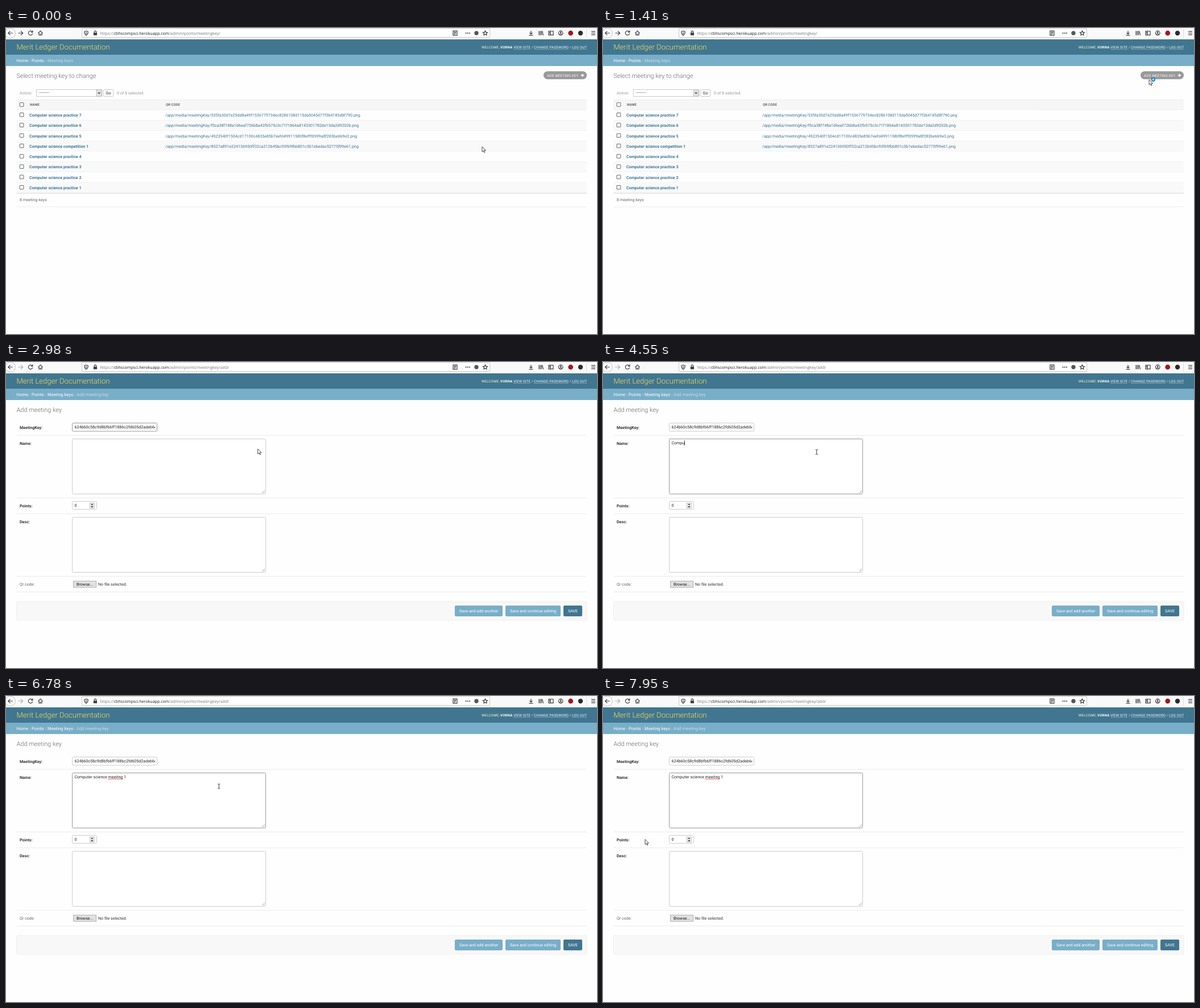
Animation, 1039 px wide and 539 px high, one loop 7990 ms. Source, as an HTML page:

```html
<!DOCTYPE html>
<html lang="en">
<head>
<meta charset="utf-8">
<title>Meeting keys</title>
<style>
html, body { margin: 0; width: 100%; height: 100%; overflow: hidden; background: #fefefe; }
svg { display: block; width: 1039px; height: 539px; }
text { font-family: Roboto, "Noto Sans", sans-serif; text-rendering: geometricPrecision; white-space: pre; }
.url { font-family: "Open Sans", "Noto Sans", sans-serif; }
.caps { letter-spacing: .27px; }
.icon { fill: none; stroke: #3c3c40; stroke-width: 1.2; }
</style>
</head>
<body>
<svg id="stage" viewBox="0 0 1039 539"></svg>
<script>
const LOOP = 7990, OPEN = 1740, LOADED = 2580, CLICK = 3370;
const BODY = 7.11, SMALL = 6.02;
const LINK = '#3a7497', DARK = '#417690', LIGHT = '#79aec8';

const text = (x, y, s, fill = '#333', size = BODY, weight = 400, attrs = '') =>
  `<text x="${x}" y="${y}" fill="${fill}" font-size="${size}" font-weight="${weight}" ${attrs}>${s}</text>`;
const caps = (x, y, s, fill, weight = 400) => text(x, y, s, fill, SMALL, weight, 'class="caps"');
const rect = (x, y, w, h, fill, stroke = 'none', rx = 0, attrs = '') =>
  `<rect x="${x}" y="${y}" width="${w}" height="${h}" fill="${fill}" stroke="${stroke}" rx="${rx}" ${attrs}/>`;
const path = (d, attrs = 'class="icon"') => `<path d="${d}" ${attrs}/>`;
const dot = (x, y, r, fill) => `<circle cx="${x}" cy="${y}" r="${r}" fill="${fill}"/>`;
const group = (id, s) => `<g id="${id}">${s}</g>`;
const rule = (y, fill = '#ececec') => rect(18.5, y, 1002.5, 1, fill);

function browserBar() {
  const url = (id, page) => `<text id="${id}" class="url" x="165.5" y="12" font-size="7.1" fill="#77777b">https://<tspan
    fill="#18181b">cbhscompsci.herokuapp.com</tspan>/admin/points/meetingkey/${page}</text>`;
  return rect(0, 0, 1039, 20, '#f9f9fa') +
    rect(133.5, .5, 717, 16, '#fff', '#c8c8cc', 1.5) +
    '<circle cx="7.5" cy="9" r="8.8" fill="#fff" stroke="#bcbcc0"/>' +
    path('M12 9H4M7.5 5.3L3.8 9L7.5 12.7') +
    path('M21.5 9H29.5M26 5.3L29.7 9L26 12.7', 'class="icon" id="forward"') +
    path('M46 6.6A3.7 3.7 0 1 0 46.7 9.6M46.9 4.6V7.3H44', 'class="icon" id="reload"') +
    path('M39.5 5.5L46.5 12.5M46.5 5.5L39.5 12.5', 'class="icon" id="stop" style="stroke:#99999d"') +
    path('M56.5 9.2L60.5 5.2L64.5 9.2M58 8.5V12.5H63V8.5M60.5 12.5V10') +
    path('M141 5.3L144.2 6.3Q144.3 11 141 13Q137.7 11 137.8 6.3ZM141 7V11') +
    rect(153.8, 8.2, 6.2, 4.6, '#3c3c40', 'none', .6) + path('M155.2 8.5V6.8a1.7 1.7 0 0 1 3.4 0V8.5') +
    url('listUrl', '') + url('addUrl', 'add/') +
    group('reader', path('M786 5.2H793V12.8H786ZM787.6 7.3H791.4M787.6 9H791.4M787.6 10.7H790')) +
    [808.6, 811.8, 815].map(x => dot(x, 9, 1.1, '#3c3c40')).join('') +
    dot(827, 9, 3.7, '#55555a') +
    path('M842.5 5L843.7 7.6L846.5 7.9L844.4 9.8L845 12.6L842.5 11.2L840 12.6L840.6 9.8L838.5 7.9L841.3 7.6Z') +
    path('M923 5V10.5M920.5 8.3L923 10.8L925.5 8.3M919.5 12.8H926.5') +
    path('M937 5.2V12.8M939.2 5.2V12.8M941.4 5.2V12.8M942.6 5.5L944.6 12.8') +
    path('M954 5.5H962V12.3H954ZM957.2 5.5V12.3M955 7.5H956.5M955 9.2H956.5') +
    '<circle class="icon" cx="975.2" cy="9" r="3.8"/>' + dot(975.2, 7.9, 1.4, '#3c3c40') +
    path('M972.9 11.4a2.6 2 0 0 1 4.6 0') +
    dot(992.7, 9, 4.4, '#a3161d') + dot(1010, 9, 4.2, '#2b2b2e') +
    rect(1020, 2, .8, 15, '#d8d8dc') +
    path('M1029 6.2H1036M1029 9H1036M1029 11.8H1036');
}

function header() {
  const tool = (x, w, s) => caps(x, 35.6, s, '#fff') + rect(x, 37, w, .7, '#fff', 'none', 0, 'opacity=".45"');
  return rect(0, 20, 1039, 27, DARK) + rect(0, 47, 1039, 20, LIGHT) +
    text(18.5, 38, 'Merit Ledger Documentation', '#f5dd5d', 13.12, 300) +
    caps(836, 35.6, 'WELCOME,', '#ffc') + caps(869, 35.6, 'VORNA', '#fff', 700) + caps(888.3, 35.6, '.', '#ffc') +
    tool(892, 30, 'VIEW SITE') + caps(924, 35.6, '/', '#ffc') +
    tool(928, 61, 'CHANGE PASSWORD') + caps(990.8, 35.6, '/', '#ffc') + tool(995, 26, 'LOG OUT') +
    text(18.5, 59.5, 'Home', '#fff', 7.65) + text(41, 59.5, '›', '#c4dce8', 7.65) +
    text(45, 59.5, 'Points', '#fff', 7.65) + text(69, 59.5, '›', '#c4dce8', 7.65);
}

const title = s => text(18.5, 88.2, s, '#666', 10.94, 300);

function listPage() {
  const files = [
    '535fa30d7e25dd8a49f1536779734ec8286108d115da5045d77f3b4185d8f790',
    'f5ca38f748a1d6eaf726b8a42fb575c3c71f1864a8143301782de13da2d9202b',
    '4523540f1504cd17100c4835e85b7eefd49911580f8efff0599a8f283be6b9e3',
    '8527a891e224136950ff32ca212b45bc93f69fbb801c3b1ebedac52775f99e61'];
  const names = ['practice 7', 'practice 6', 'practice 5', 'competition 1',
    'practice 4', 'practice 3', 'practice 2', 'practice 1'];
  const box = y => rect(24.3, y - 3.4, 6.6, 6.6, '#fff', '#555', .5, 'stroke-width=".9"');
  const rows = names.map((name, i) => {
    const y = 144.5 + 18.27 * i, base = y + 11.5;
    return rect(18.5, y, 1002.5, 18.27, i % 2 ? '#f9f9f9' : '#fefefe') + rule(y + 17.5, '#f0f0f0') +
      box(y + 8.4) + text(41, base, 'Computer science ' + name, LINK, BODY, 700) +
      (files[i] ? text(280, base, `/app/media/meetingKey/${files[i]}.png`, LINK) : '');
  }).join('');
  return text(73, 59.5, 'Meeting keys', '#c4dce8', 7.65) + title('Select meeting key to change') +
    rect(945, 76.3, 76, 14, '#999', 'none', 7, 'id="addButton"') + caps(951, 85.6, 'ADD MEETING KEY', '#fff') +
    path('M1010.8 83.4H1016.2M1013.5 80.7V86.1', 'stroke="#fff" stroke-width="1.6"') +
    text(24, 116.8, 'Action:', '#999') +
    rect(53.5, 108.5, 115, 12, '#fff', '#ccc') + text(58, 116.4, '---------') +
    rect(159, 108.8, 9, 11.4, '#e4e4e4', '#b4b4b4', 0, 'stroke-width=".8"') +
    path('M161.7 113.5L163.6 115.5L165.5 113.5') +
    rect(171, 108.5, 18, 12, '#fafafa', '#ccc', 2) + text(175.6, 116.8, 'Go') +
    text(195, 116.8, '0 of 8 selected', '#999') +
    rect(18.5, 126, 1002.5, 18.5, '#f6f6f6') + rect(281, 127, 740, 17, '#eee', 'none', 0, 'id="headHover"') +
    rule(126) + rule(143.8) + box(135) +
    text(42, 137.4, 'NAME', '#666', SMALL, 700) + text(281, 137.4, 'QR CODE', '#666', SMALL, 700) +
    rows + rule(290.6, '#ddd') + text(24, 305.2, '8 meeting keys', '#666') + rule(314.5, '#eee');
}

function addPage() {
  const label = (y, s) => text(24, y, s, '#333', BODY, 700);
  const area = (id, y) => rect(116.5, y, 340, 97, '#fff', '#ccc', 2, `id="${id}"`) +
    path(`M450 ${y + 95.5}L455 ${y + 90.5}M452.5 ${y + 95.5}L455 ${y + 93}`, 'stroke="#999" stroke-width=".8"');
  const button = (x, w, fill, tx, s) => rect(x, 429, w, 19, fill, 'none', 2) + text(tx, 441, s, '#fff');
  return text(73, 59.5, 'Meeting keys', '#fff', 7.65) + text(120, 59.5, '›', '#c4dce8', 7.65) +
    text(124, 59.5, 'Add meeting key', '#c4dce8', 7.65) + title('Add meeting key') +
    [128.7, 239, 266.7, 377, 404.5].map(y => rule(y)).join('') +
    label(118.3, 'MeetingKey:') + label(146.1, 'Name:') + label(256.2, 'Points:') + label(284.1, 'Desc:') +
    text(24, 394.1, 'Qr code:', '#666') +
    rect(116.5, 107.5, 149, 14.5, '#fff', '#ccc', 2, 'id="keyField"') +
    '<clipPath id="clip"><rect x="118" y="108" width="144.3" height="14"/></clipPath>' +
    text(120.4, 117.3, '624b60c58c9d8bfb6ff1886c2fd605d2adeb6e1', '#222', BODY, 400, 'clip-path="url(#clip)"') +
    area('nameField', 135.5) + area('descField', 273.5) +
    text(120.4, 145.2, '', '#222', BODY, 400, 'id="typed"') +
    path('M179.5 147' + 'l1 -1.2l1 1.2'.repeat(13), 'id="squiggle" fill="none" stroke="#e22" stroke-width=".7"') +
    rect(0, 0, .8, 9, '#111', 'none', 0, 'id="caret"') +
    rect(116.5, 245.5, 43, 14, '#fff', '#ccc', 2) + text(120.4, 255.3, '0', '#222') +
    rect(147.4, 248.2, 7.8, 9.4, '#eee', '#aaa', 0, 'stroke-width=".7"') +
    path('M149.2 251.8L151.3 249.4L153.4 251.8ZM149.2 254L151.3 256.4L153.4 254Z', 'fill="#222"') +
    rect(118.5, 386, 40, 11, '#e2e2e2', '#adadad') + text(124, 394.1, 'Browse...', '#111') +
    text(162, 394.1, 'No file selected.') +
    rect(18.5, 422, 1002.5, 33, '#f8f8f8', '#eee', 2) +
    button(789, 84, LIGHT, 797, 'Save and add another') +
    button(878, 97, LIGHT, 886, 'Save and continue editing') +
    button(980, 33, DARK, 988, 'SAVE');
}

const pointers = group('arrow', path('M0 0V9L2.1 7.1L3.6 10.4L5 9.8L3.6 6.6H6.4Z',
    'fill="#fff" stroke="#222" stroke-width=".8"')) +
  group('beam', path('M-2 -4H-.5L0 -3.5L.5 -4H2M0 -3.5V3.5M-2 4H-.5L0 3.5L.5 4H2',
    'fill="none" stroke="#222" stroke-width=".9"')) +
  group('hand', path('M-1 1Q0 -.8 1 1V4.5L5 5.5V8L4 11H0L-3 7L-2.2 6L-1 7Z',
    'fill="#fff" stroke="#222" stroke-width=".8"')) +
  group('busy', '<circle cx="7.3" cy="-.3" r="2.7" fill="#bfe3fa" stroke="#1f86d0" stroke-width="2"/>' +
    path('M7.3 -4A3.7 3.7 0 0 1 11 -.3', 'id="spin" fill="none" stroke="#6cc0f2" stroke-width="1"'));

const stage = document.getElementById('stage');
stage.innerHTML = browserBar() + header() + group('listPage', listPage()) + group('addPage', addPage()) +
  group('pointer', pointers);

const el = id => document.getElementById(id);
const show = (id, on) => el(id).setAttribute('visibility', on ? 'inherit' : 'hidden');
const set = (id, name, value) => el(id).setAttribute(name, value);

// Pointer stops: time, x, y
const stops = [[0, 837, 209], [80, 837, 209], [250, 850, 193], [600, 905, 136], [870, 929, 111],
  [1130, 962, 85], [1300, 962, 85], [1400, 960, 91], [1650, 961, 91], [1740, 963, 89.3], [2170, 963, 89.3],
  [2300, 890, 104], [2530, 721, 128], [2980, 443, 153], [3180, 380, 158], [3300, 375.7, 158.5],
  [6700, 375.7, 158.5], [6780, 374.5, 159], [6950, 352, 165], [7300, 230, 212], [7570, 161, 241],
  [7800, 96, 250], [7950, 74, 252.5], [LOOP, 74, 252.5]];
function pointerAt(t) {
  const i = stops.findIndex(s => s[0] > t), [t0, x0, y0] = stops[i - 1], [t1, x1, y1] = stops[i];
  const k = (t - t0) / (t1 - t0);
  return [x0 + (x1 - x0) * k, y0 + (y1 - y0) * k];
}

// Bursts of typing: first key, last key, number of keys
const phrase = 'Computer science meeitng 1';
const bursts = [[4060, 4060, 1], [4220, 4410, 3], [4550, 5290, 10], [5390, 5670, 5], [5810, 6050, 5], [6330, 6430, 2]];
const typedCount = t => bursts.reduce((sum, [a, b, n]) =>
  sum + (t < a ? 0 : t >= b ? n : 1 + Math.floor((t - a) / (b - a) * (n - 1))), 0);

function draw(t) {
  const adding = t >= OPEN, loading = adding && t < LOADED, inName = t >= CLICK;
  const [x, y] = pointerAt(t);
  const onButton = t < 1400 && x > 946 && y < 90.3;
  const onText = adding && t > 3000 && x > 116 && x < 456 && y < 233;

  show('listPage', !adding);
  show('addPage', adding);
  show('listUrl', !adding);
  show('addUrl', adding);
  show('stop', loading);
  show('reload', !loading);
  show('reader', !adding || t >= 2500);
  set('forward', 'opacity', adding ? .4 : 1);
  set('addButton', 'fill', onButton ? DARK : '#999');
  show('headHover', !adding && y > 127 && y < 144);

  set('keyField', 'stroke', inName ? '#ccc' : '#999');
  set('nameField', 'stroke', inName ? '#999' : '#ccc');
  el('typed').textContent = phrase.slice(0, typedCount(t));
  const blinkOff = (t >= 2500 && t < 3000) || (t >= 3820 && t < 4060) || t >= 6780;
  const caretX = 120.4 + (inName && typedCount(t) ? el('typed').getComputedTextLength() : 0);
  set('caret', 'x', caretX);
  set('caret', 'y', inName ? 138 : 110);
  show('caret', adding && !blinkOff);
  show('squiggle', t >= 6330);

  set('pointer', 'transform', `translate(${x} ${y})`);
  show('hand', onButton);
  show('beam', onText);
  show('arrow', !onButton && !onText);
  show('busy', t >= 1400 && !adding);
  set('spin', 'transform', `rotate(${t * .36} 7.3 -.3)`);
}

const start = performance.now();
function frame() {
  draw((performance.now() - start) % LOOP);
  requestAnimationFrame(frame);
}
frame();
</script>
</body>
</html>
```
